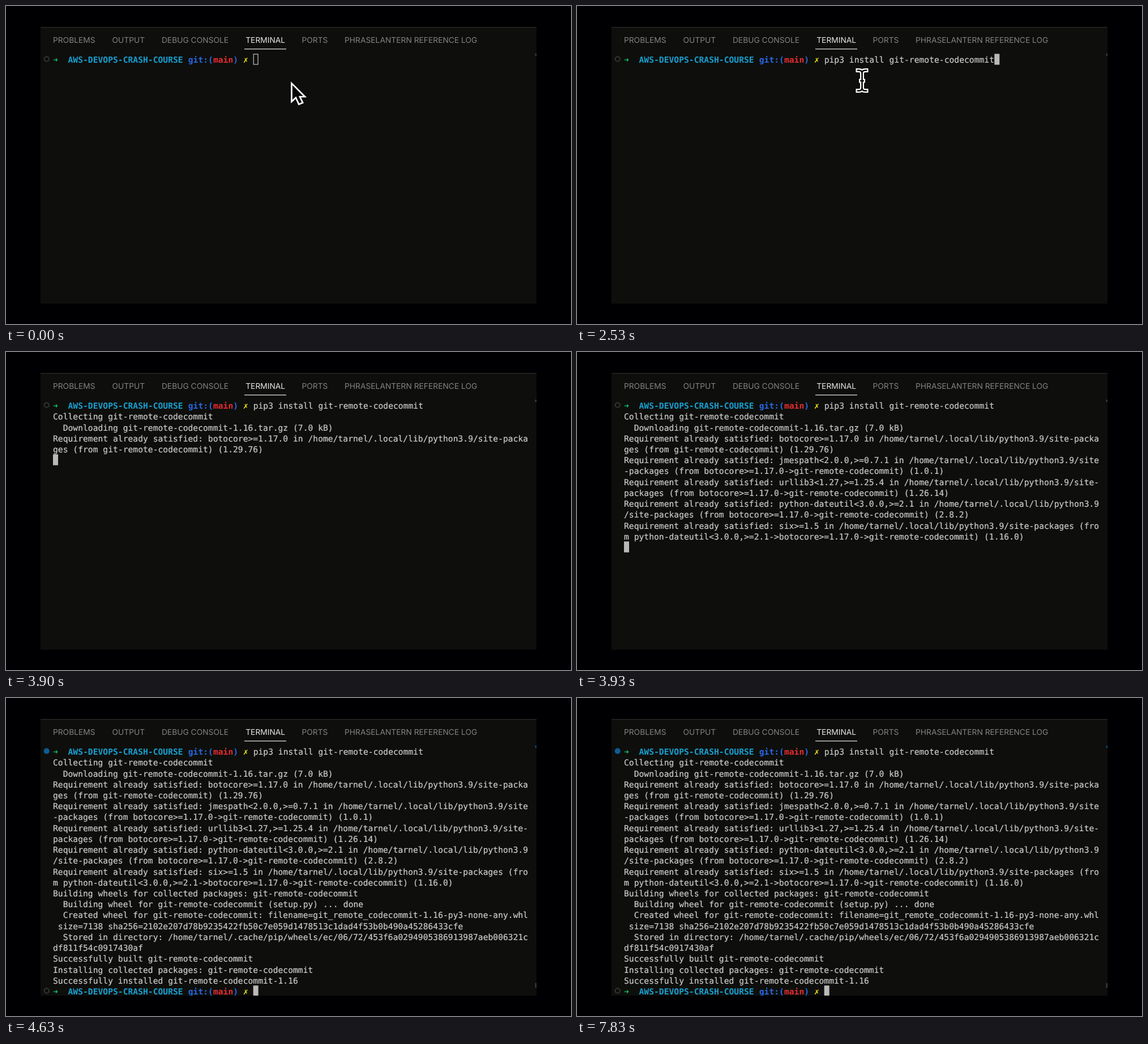
Write an HTML page that moves like this. It is 998 px wide and 561 px high and loops after 8000 ms.

```html
<!DOCTYPE html>
<html lang="en">
<head>
<meta charset="utf-8">
<title>Terminal install</title>
<style>
  html, body { margin: 0; width: 100%; height: 100%; overflow: hidden; background: #000002; }
  svg { display: block; width: 998px; height: 561px; text-rendering: geometricPrecision; }
  text { white-space: pre; }
  #tabs { font: 13.8px Inter, "Open Sans", sans-serif; fill: #838381; }
  #term { font: 14.687px "DejaVu Sans Mono", "DejaVu Sans", monospace; color: #cacac8; }
  #term text { fill: currentColor; stroke: currentColor; stroke-width: 0.22; }
  #term .prompt { font-weight: bold; stroke: none; }
</style>
</head>
<body>
<svg viewBox="0 0 998 561">
  <clipPath id="panel"><path d="M61 37H937V525H61Z"/></clipPath>
  <path d="M61 37H937V525H61Z" fill="#0e0f0c"/>
  <path d="M61 37.6H937" stroke="#292a28" stroke-width="1.3"/>
  <g id="tabs"></g>
  <path d="M421 75.9H495" stroke="#e4e4e2" stroke-width="1.3"/>
  <g clip-path="url(#panel)">
    <path id="topMark" d="M934.6 84H937V88H934.6Z"/>
    <path id="endMark" d="M934.6 503H937V511H934.6Z" fill="#3a3b39"/>
    <circle id="topDot" cx="71.7" cy="93.6" stroke-width="1.5"/>
    <circle id="endDot" cx="71.7" cy="516.5" r="4.2" fill="none" stroke="#3f403e" stroke-width="1.5"/>
    <rect id="mark" height="19.2" fill="#b4b4b4"/>
    <rect id="caret"/>
    <g id="term"></g>
  </g>
  <path id="arrow" d="M504.5 136.4V168.6L512 161.8L517.3 173.4L524.2 170.6L519 160H528Z"
        fill="#050505" stroke="#fff" stroke-width="2.7"/>
  <g id="beam" fill="none" stroke-linecap="square"></g>
</svg>
<script>
const LOOP = 8000, LEFT = 83, COL = 8.842, TOP = 84.4, ROW = 19.22;
const pkg = 'git-remote-codecommit';
const site = '/home/tarnel/.local/lib/python3.9/site';
const have = 'Requirement already satisfied: ';
const output = [
  `Collecting ${pkg}`,
  `  Downloading ${pkg}-1.16.tar.gz (7.0 kB)`,
  `${have}botocore>=1.17.0 in ${site}-packa`,
  `ges (from ${pkg}) (1.29.76)`,
  `${have}jmespath<2.0.0,>=0.7.1 in ${site}`,
  `-packages (from botocore>=1.17.0->${pkg}) (1.0.1)`,
  `${have}urllib3<1.27,>=1.25.4 in ${site}-`,
  `packages (from botocore>=1.17.0->${pkg}) (1.26.14)`,
  `${have}python-dateutil<3.0.0,>=2.1 in ${site.slice(0, -5)}`,
  `/site-packages (from botocore>=1.17.0->${pkg}) (2.8.2)`,
  `${have}six>=1.5 in ${site}-packages (fro`,
  `m python-dateutil<3.0.0,>=2.1->botocore>=1.17.0->${pkg}) (1.16.0)`,
  `Building wheels for collected packages: ${pkg}`,
  `  Building wheel for ${pkg} (setup.py) ...`,
  `  Created wheel for ${pkg}: filename=git_remote_codecommit-1.16-py3-none-any.whl`,
  ' size=7138 sha256=2102e207d78b9235422fb50c7e059d1478513c1dad4f53b0b490a45286433cfe',
  '  Stored in directory: /home/tarnel/.cache/pip/wheels/ec/06/72/453f6a0294905386913987aeb006321c',
  'df811f54c0917430af',
  `Successfully built ${pkg}`,
  `Installing collected packages: ${pkg}`,
  `Successfully installed ${pkg}-1.16`
];

// time, printed output rows, caret row, caret column
const states = [
  [0, 0, 0, 40], [1200, 0, 0, 74], [2600, 0, 1, 0],
  [3460, 1, 2, 0], [3700, 2, 3, 0],
  [3900, 4, 5, 0], [3930, 12, 13, 0], [3960, 14, 14, 58],
  [4100, 14, 15, 0], [4130, 19, 20, 0],
  [4300, 20, 21, 0], [4350, 21, 22, 0], [4630, 21, 22, 40]
];

const $ = id => document.getElementById(id);
const set = (el, attrs) => { for (const k in attrs) el.setAttribute(k, attrs[k]); };
const show = (el, on) => { el.style.display = on ? '' : 'none'; };
const colX = c => LEFT + c * COL;

function add(parent, tag, attrs, text = '') {
  const el = document.createElementNS('http://www.w3.org/2000/svg', tag);
  set(el, attrs);
  el.textContent = text;
  return parent.appendChild(el);
}

const print = (text, row, col = 0) =>
  add($('term'), 'text', { x: colX(col), y: 100.1 + row * ROW }, text);

function prompt(row) {
  const el = print('', row);
  el.setAttribute('class', 'prompt');
  const parts = [
    [0, '➜', '#12bd6c'], [3, 'AWS-DEVOPS-CRASH-COURSE', '#189fd0'],
    [27, 'git:(', '#2768e6'], [32, 'main', '#ea2a30'],
    [36, ')', '#2768e6'], [38, '✗', '#f2ea18']
  ];
  for (const [col, text, fill] of parts) add(el, 'tspan', { x: colX(col), fill }, text);
  return el;
}

const tabs = [
  [82.9, 'PROBLEMS'], [187.5, 'OUTPUT'], [274.9, 'DEBUG CONSOLE'],
  [423.2, 'TERMINAL'], [522.4, 'PORTS'], [598, 'PHRASELANTERN REFERENCE LOG']
];
for (const [x, name] of tabs) {
  add($('tabs'), 'text', { x, y: 65.1, fill: name === 'TERMINAL' ? '#e8e8e6' : '#838381' }, name);
}

const beamPath = 'M496 113.5h2q5.5 0 5.5 5v26q0 5-5.5 5h-2' +
  'M511 113.5h-2q-5.5 0-5.5 5v26q0 5 5.5 5h2M501.5 132h4';
add($('beam'), 'path', { d: beamPath, stroke: '#fff', 'stroke-width': 7 });
add($('beam'), 'path', { d: beamPath, stroke: '#080808', 'stroke-width': 2.6 });

prompt(0);
const command = print(`pip3 install ${pkg}`, 0, 40);
const lines = output.map((text, i) => print(text, i + 1));
const done = print('done', 14, 58);
const lastPrompt = prompt(22);
set($('mark'), { x: colX(40), y: TOP, width: 34 * COL });

function draw(t) {
  const [, rows, row, col] = states.findLast(s => s[0] <= t);
  const pasted = t >= 1200 && t < 2530;
  const finished = t >= 4400, ready = t >= 4630, focused = t >= 100;

  lines.forEach((line, i) => show(line, i < rows));
  show(done, t >= 4100);
  show(command, t >= 1200);
  command.style.color = pasted ? '#0a0a0a' : '';
  show($('mark'), pasted);

  const inset = focused ? 0 : 0.6;
  set($('caret'), {
    x: colX(col) + inset, y: TOP + row * ROW + inset,
    width: 9 - 2 * inset, height: ROW - 2 * inset,
    fill: focused ? '#b9b9b7' : 'none',
    stroke: focused ? 'none' : '#c4c4c2', 'stroke-width': 1.2
  });

  set($('topDot'), finished
    ? { r: 5, fill: '#0e5c94', stroke: 'none' }
    : { r: 4.2, fill: 'none', stroke: '#3f403e' });
  set($('topMark'), { fill: finished ? '#0e4a76' : '#3a3b39' });
  for (const el of [lastPrompt, $('endDot'), $('endMark')]) show(el, ready);

  // The pointer sweeps up and to the right in hard steps near the end.
  const leaving = t >= 7730 && t < 7830;
  const k = t < 7760 ? 0 : t < 7800 ? 0.43 : 1;
  show($('arrow'), t < 60 || leaving);
  set($('arrow'), {
    transform: leaving ? `translate(${8 + 71.5 * k} ${-8.5 - 88.5 * k})` : 'translate(0 0)'
  });
  show($('beam'), t >= 60 && t < 2570);
}

const start = performance.now();
function tick() {
  draw((performance.now() - start) % LOOP);
  requestAnimationFrame(tick);
}
tick();
</script>
</body>
</html>
```
